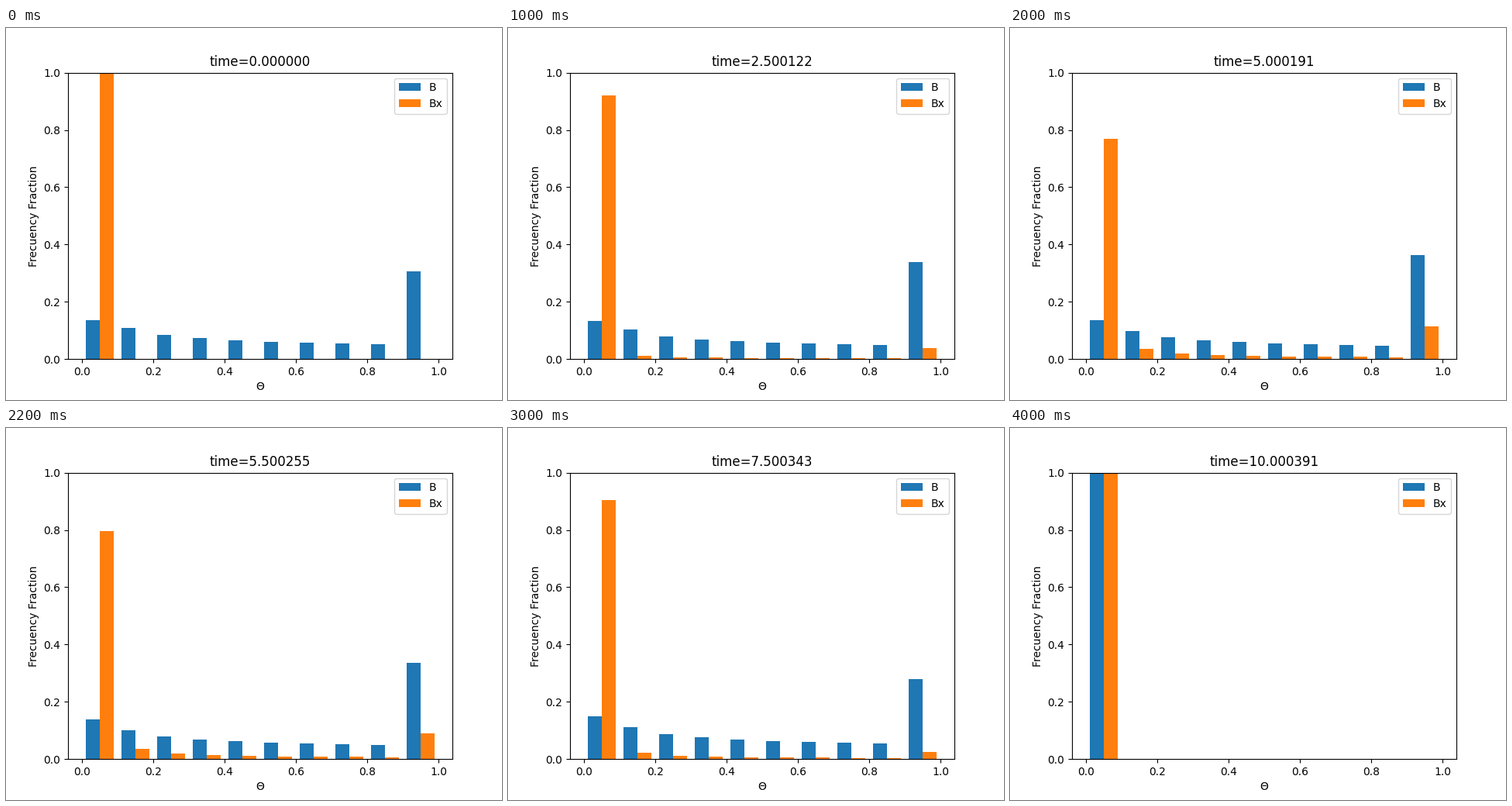
These frames come from a looping animation (640x480 px, 4.2 s). A matplotlib script:

```python
import matplotlib.pyplot as plt
import numpy as np
from matplotlib.animation import FuncAnimation

FRAMES, INTERVAL, STEP = 21, 200, 0.5
WIDTH = 0.04
LEFT = np.arange(10) / 10 + 0.01

# Key points: sample time, then first and last bin of B, then of Bx.
KEYS = np.array([
    (0.000000, 0.136, 0.306, 1.000, 0.000),
    (0.500051, 0.136, 0.318, 1.000, 0.000),
    (1.500153, 0.136, 0.341, 0.890, 0.068),
    (3.500092, 0.131, 0.336, 0.950, 0.011),
    (5.000191, 0.136, 0.363, 0.769, 0.114),
    (6.500384, 0.147, 0.279, 0.853, 0.038),
    (8.500302, 0.149, 0.277, 0.958, 0.011),
    (9.500361, 0.143, 0.290, 0.975, 0.006),
    (10.000391, 1.000, 0.000, 0.997, 0.000),
])
KEY_FRAMES = np.round(KEYS[:, 0] / STEP)


def shares(first, last, power):
    """Spread what the end bins leave over the inner bins as a power law."""
    inner = np.arange(1, 9) ** -power
    inner *= (1 - first - last) / inner.sum()
    return [first, *inner, last]


fig, ax = plt.subplots(figsize=(6.4, 4.8), dpi=100)
b_bars = ax.bar(LEFT, np.ones(10), WIDTH, align="edge", color="#1f77b4", label="B")
bx_bars = ax.bar(LEFT + WIDTH, np.ones(10), WIDTH, align="edge",
                 color="#ff7f0e", label="Bx")
ax.set_xlim(-0.039, 1.039)
ax.set_ylim(0, 1)
ax.set_xlabel("Θ")
ax.set_ylabel("Frecuency Fraction")
ax.legend(loc="upper right")
title = ax.set_title("")


def update(frame):
    time, b_first, b_last, bx_first, bx_last = (
        np.interp(frame, KEY_FRAMES, column) for column in KEYS.T)
    title.set_text(f"time={time:.6f}")
    for bars, values in ((b_bars, shares(b_first, b_last, 0.35)),
                         (bx_bars, shares(bx_first, bx_last, 0.8))):
        for bar, value in zip(bars, values):
            bar.set_height(value)
    return [title, *b_bars, *bx_bars]


anim = FuncAnimation(fig, update, frames=FRAMES, interval=INTERVAL,
                     repeat=True, repeat_delay=0)
plt.show()
```
